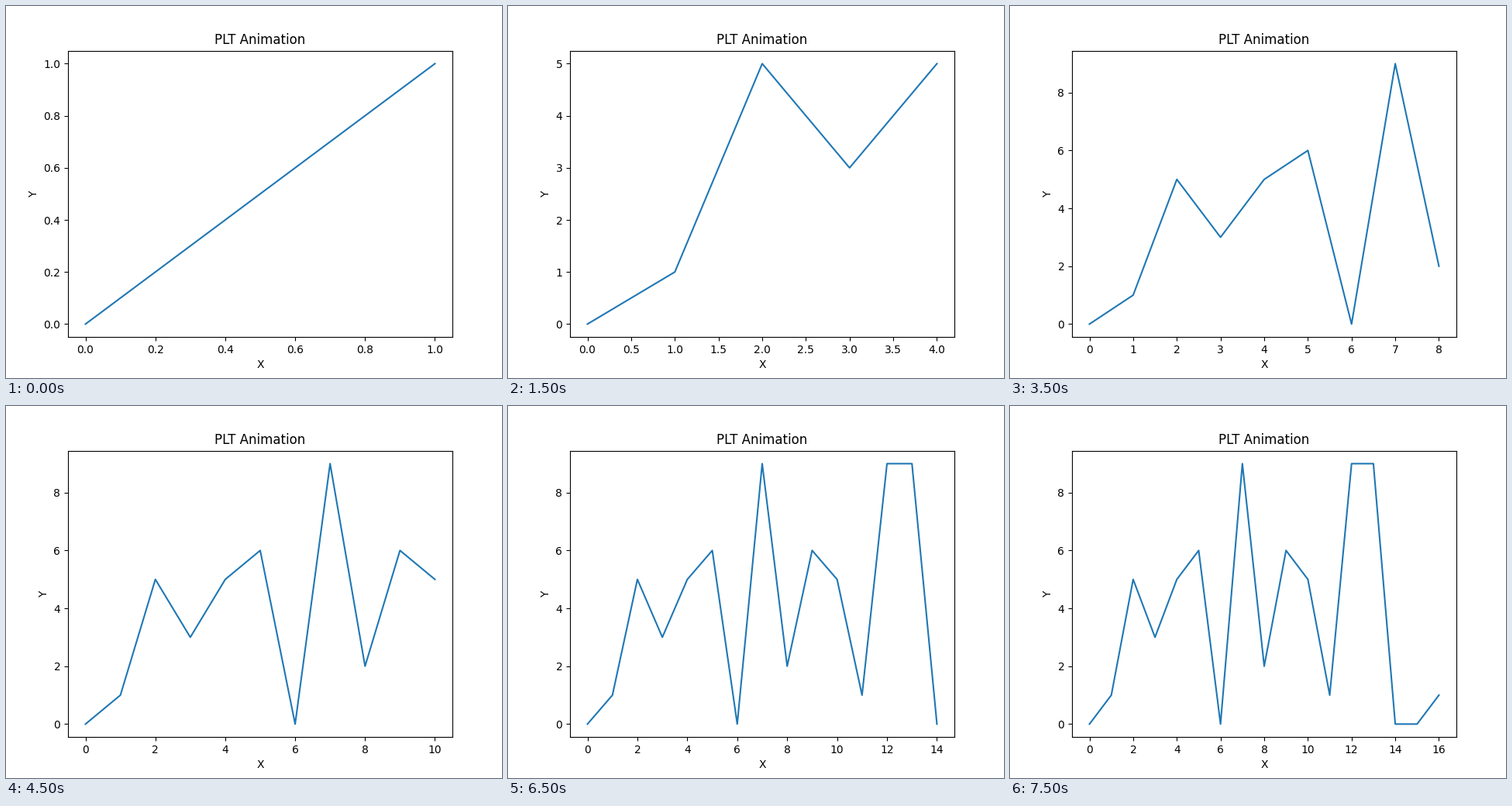
A matplotlib script that plays this animation: 640 px wide and 480 px high, repeating every 8 s.

```python
import matplotlib.pyplot as plt
from matplotlib.animation import FuncAnimation

VALUES = [0, 1, 5, 3, 5, 6, 0, 9, 2, 6, 5, 1, 9, 9, 0, 0, 1]
STEP_MS = 500

fig, ax = plt.subplots(figsize=(6.4, 4.8), dpi=100)
ax.set(title="PLT Animation", xlabel="X", ylabel="Y")
line, = ax.plot([], [], color="tab:blue", linewidth=1.5)


def update(step):
    """Show one more point per step and refit the axes."""
    count = step + 2
    line.set_data(range(count), VALUES[:count])
    ax.relim()
    ax.autoscale_view()
    return line,


def reset():
    return update(0)


anim = FuncAnimation(fig, update, frames=len(VALUES) - 1, init_func=reset,
                     interval=STEP_MS, repeat=True, repeat_delay=0, blit=False)

plt.show()
```
